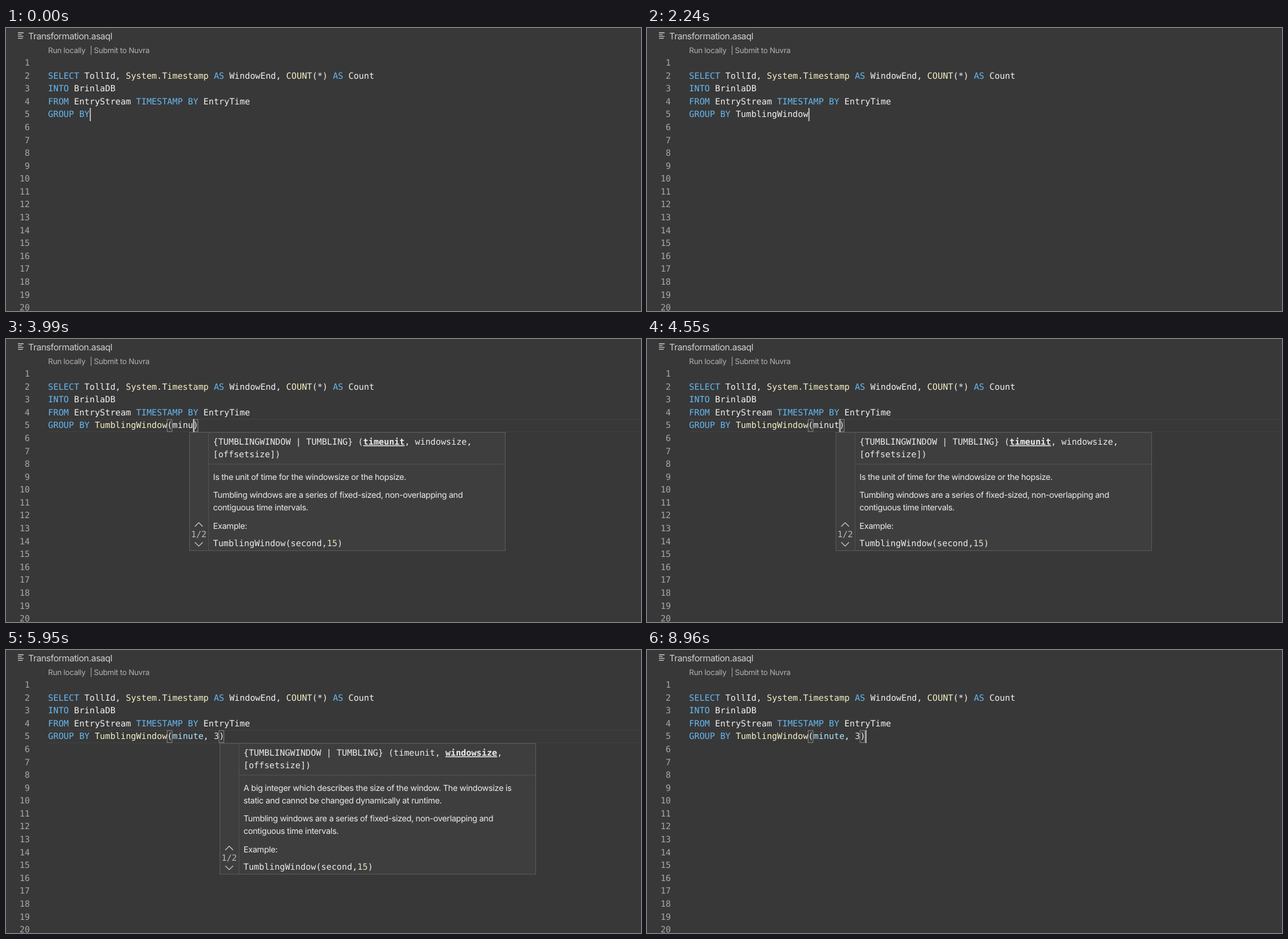
An HTML page that plays this animation: 1064x474 px, repeating every 9030 ms.

```html
<!DOCTYPE html>
<html lang="en">
<head>
<meta charset="utf-8">
<title>Query editor</title>
<style>
  html, body { margin: 0; width: 100%; height: 100%; overflow: hidden; background: #383838; }
  svg { display: block; width: 1064px; height: 474px; }
  text { white-space: pre; text-rendering: geometricPrecision; }
  .mono { font: 14.41px "DejaVu Sans Mono", monospace; }
  .ui { font: 13.8px Inter, sans-serif; letter-spacing: -0.32px; }
  .title { font-size: 15px; letter-spacing: -0.44px; }
  .lens { font-size: 12.8px; letter-spacing: -0.29px; }
  .bold { font-weight: bold; }
  .param { font-weight: bold; text-decoration: underline; }
</style>
</head>
<body>
<svg viewBox="0 0 1064 474">
  <rect width="1064" height="474" fill="#383838"/>
  <g id="page"></g>
  <g id="live"></g>
</svg>
<script>
const LOOP = 9030, X0 = 70.6, CW = 8.675, ROW = 21.58, TOP = 156.5;
const C = { text: '#f2f2f2', key: '#66b8f2', fn: '#f4f0c4', arg: '#aee4ff', num: '#d8e8c8',
  dim: '#a8a8a8', soft: '#bababa', doc: '#ececec', edge: '#5b5b5b', panel: '#3e3e3e' };

const colX = c => X0 + c * CW;
const lineY = n => 63.1 + ROW * (n - 1);

const rect = (x, y, w, h, fill, stroke = 'none') =>
  `<rect x="${x}" y="${y}" width="${w}" height="${h}" fill="${fill}" stroke="${stroke}"/>`;
const path = (d, stroke, width = 1) =>
  `<path d="${d}" fill="none" stroke="${stroke}" stroke-width="${width}"/>`;
const ui = (x, y, s, fill = C.doc, cls = '') =>
  `<text class="ui ${cls}" x="${x}" y="${y}" fill="${fill}">${s}</text>`;
// parts: [text, colour, class]
const mono = (x, y, parts, anchor = 'start') =>
  `<text class="mono" x="${x}" y="${y}" text-anchor="${anchor}">` + parts.map(([s, fill, cls = '']) =>
    `<tspan fill="${fill}" class="${cls}">${s}</tspan>`).join('') + '</text>';

// time, text typed after "GROUP BY"
const call = ' TumblingWindow';
const edits = [[-290, ''], [560, ' '], [700, ' T'], [1750, call], [2730, call + '('],
  [3080, call + '(m'], [3290, call + '(mi'], [3780, call + '(min'], [3990, call + '(minu'],
  [4480, call + '(minut'], [4690, call + '(minute'], [4900, call + '(minute,'],
  [5110, call + '(minute, '], [5390, call + '(minute, 3'], [6630, call + '(minute, 3)']];

// time, column the parameter hint is anchored to (0 = hidden)
const hints = [[0, 0], [2870, 24], [3150, 25], [3780, 26], [3920, 27], [4060, 28], [4620, 29],
  [4760, 30], [4970, 31], [5180, 32], [5530, 33], [6720, 34], [6930, 0]];

const windowDoc = {
  sig: ['{TUMBLINGWINDOW | TUMBLING} (timeunit, wi', 'ndowsize, [offsetsize])'],
  doc: ['Tumbling windows are a series of fixed-sized, non-', 'overlapping and contiguous time intervals.']
};
const minDoc = { sig: ['MIN (expression)'], doc: ['Returns the minimum value in the expression.'] };

const lists = [
  { from: 840, to: 1750, info: windowDoc, match: 1,
    items: ['TumblingWindow', 'TIMESTAMP', 'TopOne', 'TRY_CAST', 'TOP', 'TAN'] },
  { from: 3290, to: 3990, info: minDoc, match: 2, items: ['MIN'] },
  { from: 5180, to: 5390, info: windowDoc, match: 0, thumb: 361,
    items: ['TumblingWindow', 'UPPER', 'VAR', 'VARP', 'Window', 'Windows', 'YEAR',
      'Snippet:Convert data types(SELECT Que…', 'Snippet:Correlate two event types wit…',
      'Snippet:Count unique values(SELECT Qu…', 'Snippet:Detect the absence of events(…',
      'Snippet:Detect the duration between e…'] }
];

const last = (track, t) => track.reduce((a, b) => b[0] <= t ? b : a);

function drawPage() {
  let s = path('M20 8H29.5M20 11.2H26.5M20 14.2H29.5M20 17.4H28', '#cacaca', 1.3);
  s += ui(37.3, 19, 'Transformation.asaql', '#d0d0d0', 'title');
  s += ui(70.5, 42, 'Run locally', '#b2b2b2', 'lens') + ui(140.5, 42, '|', '#b2b2b2', 'lens');
  s += ui(147.3, 42, 'Submit to Nuvra', '#b2b2b2', 'lens');
  for (let n = 1; n <= 20; n++) s += mono(40, lineY(n), [[n, C.dim]], 'end');
  s += mono(X0, lineY(2), [['SELECT', C.key], [' TollId, ', C.text], ['System.Timestamp', C.fn],
    [' AS', C.key], [' WindowEnd, ', C.text], ['COUNT', C.fn], ['(*)', C.text],
    [' AS', C.key], [' Count', C.text]]);
  s += mono(X0, lineY(3), [['INTO', C.key], [' BrinlaDB', C.text]]);
  s += mono(X0, lineY(4), [['FROM', C.key], [' EntryStream', C.text], [' TIMESTAMP BY', C.key],
    [' EntryTime', C.text]]);
  return s;
}

function drawLine(typed, caretOn) {
  const [name, args] = typed.split('(');
  const open = args !== undefined, parts = [['GROUP BY', C.key], [name, open ? C.fn : C.text]];
  const end = 8 + typed.length;
  let s = '';
  if (open) {
    const body = args.replace(')', ''), done = body.startsWith('minute');
    parts.push(['(', C.text], [body.slice(0, 6), done ? C.arg : C.text],
      [body.slice(6, 8), C.text], [body.slice(8), C.num], [')', C.text]);
    const close = args.endsWith(')') ? end - 1 : end;
    for (const c of [23, close]) s += rect(colX(c), 135, CW - 0.6, 20, 'none', '#8a8a8a');
  }
  s += mono(X0, lineY(5), parts);
  if (caretOn) s += rect(colX(end) + 0.4, 134, 1.7, 22, '#cfcfcf');
  return s;
}

function drawHint(col, second) {
  const x = Math.round(366 + (col - 34) * 8.4) + 0.5, tx = x + 39.5, px = x + 32;
  const h = second ? 219 : 198, low = second ? 21 : 0;
  let s = rect(x, TOP, 529, h, C.panel, C.edge);
  s += path(`M${px} ${TOP}v${h}M${px} 209.5H${x + 529}`, '#525252');
  s += path(`M${x + 9} ${314 + low}l6.5 -6.5l6.5 6.5M${x + 9} ${340.5 + low}l6.5 6.5l6.5 -6.5`, '#d0d0d0', 1.2);
  s += mono(x + 2.5, 332 + low, [['1/2', C.soft]]);
  s += mono(tx, 177, [['{TUMBLINGWINDOW | TUMBLING} (', C.doc], ['timeunit', C.doc, second ? '' : 'param'],
    [', ', C.doc], ['windowsize', C.doc, second ? 'param' : ''], [',', C.doc]]);
  s += mono(tx, 198, [['[offsetsize])', C.doc]]);
  if (second) {
    s += ui(tx, 236, 'A big integer which describes the size of the window. The windowsize is');
    s += ui(tx, 257, 'static and cannot be changed dynamically at runtime.');
  } else {
    s += ui(tx, 236, 'Is the unit of time for the windowsize or the hopsize.');
  }
  s += ui(tx, 266 + low, 'Tumbling windows are a series of fixed-sized, non-overlapping and');
  s += ui(tx, 287 + low, 'contiguous time intervals.') + ui(tx, 318 + low, 'Example:');
  return s + mono(tx, 347 + low, [['TumblingWindow(second,', C.doc], ['15', C.num], [')', C.doc]]);
}

const cube = (x, y) => path(`M${x} ${y - 7.5}l6.5 3.5v8l-6.5 3.5l-6.5 -3.5v-8zM${x - 6.5} ${y - 4}l6.5 3.5l6.5 -3.5M${x} ${y - 0.5}v8`, '#b794de', 1.2);
const snippet = (x, y) => path(`M${x - 7} ${y + 6}v-13h14v13`, '#d4d4d4', 1.2) +
  `<path d="M${x - 7} ${y + 7.5}h15" stroke="#d4d4d4" stroke-width="1.3" stroke-dasharray="1.5 1.5"/>`;

function drawList({ items, info, match, thumb }, col) {
  const x = Math.round(colX(col)) + 0.5, w = 395, dx = x + w;
  const h = items.length * 21.5;
  const sigH = info.sig.length * 21, docY = 197 + sigH;
  let s = rect(dx, TOP, 396, 31 + sigH + info.doc.length * 20.7, C.panel, C.edge);
  info.sig.forEach((r, i) => s += mono(dx + 7, 177 + i * 21, [[r, C.soft]]));
  info.doc.forEach((r, i) => s += ui(dx + 7.8, docY + i * 21, r));
  s += rect(x, TOP, w, h, C.panel, C.edge) + rect(x + 0.5, TOP + 0.5, w - 1, 21, '#18486a');
  items.forEach((name, i) => {
    const y = 167 + i * 21.63;
    s += (name.startsWith('Snippet') ? snippet : cube)(x + 12.5, y);
    s += mono(x + 27.3, y + 5.2, [[name.slice(0, match), '#4aa9f0', 'bold'], [name.slice(match), C.text]]);
  });
  if (thumb) s += rect(x + w - 13, thumb, 12.5, 30.5, '#5e5e5e');
  return s;
}

const live = document.getElementById('live');
document.getElementById('page').innerHTML = drawPage();
let shown = '';

function render(t) {
  const [at, typed] = last(edits, t), col = 8 + typed.length;
  const caretOn = Math.floor((t - at) / 500) % 2 === 0;
  const hintCol = last(hints, t)[1];
  const list = lists.find(l => t >= l.from && t < l.to);
  let s = '';
  if (t >= 2730 && t < 6930) s += path('M70 134.5H1064M70 155.5H1064', '#424242');
  s += drawLine(typed, caretOn);
  if (hintCol) s += drawHint(hintCol, typed.includes(','));
  if (list) s += drawList(list, col);
  if (s !== shown) live.innerHTML = shown = s;
}

function tick() {
  render(performance.now() % LOOP);
  requestAnimationFrame(tick);
}
tick();
</script>
</body>
</html>
```
